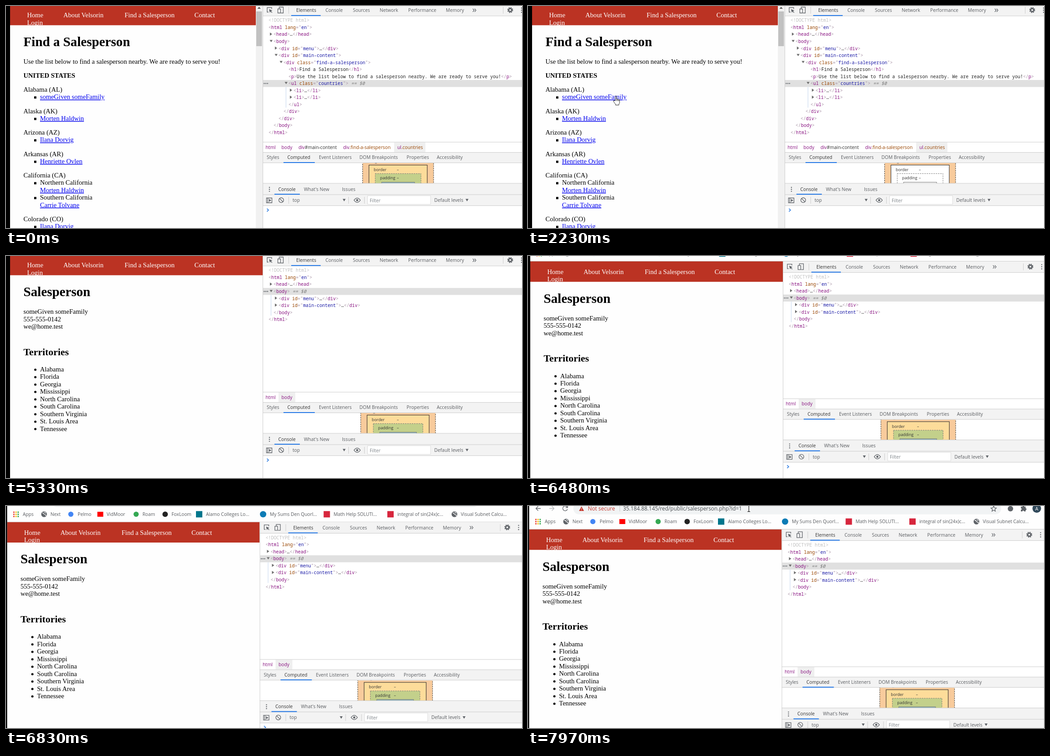
Recreate the animation shown at these times as an HTML page. Size 1138 by 492 pixels, loop 8000 ms.

```html
<!DOCTYPE html>
<html lang="en">
<head>
<meta charset="utf-8">
<title>Find a Salesperson</title>
<style>
html, body { margin: 0; width: 100%; height: 100%; overflow: hidden; background: #fefefe; }
svg { display: block; }
.page { font: 14.6px "Liberation Serif", "Times New Roman", serif; fill: #000; }
.page .h1 { font-size: 29.2px; font-weight: bold; }
.page .h2 { font-size: 21.9px; font-weight: bold; }
.bold { font-weight: bold; }
.link { fill: #00e; text-decoration: underline; }
.nav { fill: #fff; }
.ui { font: 10.25px "Open Sans", "Noto Sans", sans-serif; fill: #5a5d61; }
.ui .on { fill: #333; }
.ui .tag, .code .tag { fill: #881280; }
.ui .attr, .code .attr { fill: #994500; }
.ui .small { font-size: 8.8px; fill: #333; }
.ui .url { font-size: 11.85px; fill: #45484c; }
.ui .hint { fill: #80868b; }
.code { font: 10.03px "Noto Sans Mono", "DejaVu Sans Mono", monospace; fill: #222; }
.code .punct { fill: #a894a6; }
.code .val { fill: #1a1aa6; }
.code .doctype { fill: #c0c0c0; }
.code .ref { fill: #777; font-style: italic; }
.line { stroke: #ccc; fill: none; }
.icon { stroke: #5f6368; fill: none; stroke-width: 1.3; }
.bar { fill: #f3f3f3; }
.blue { fill: #1a73e8; }

#cam, #list, #detail, #tree1, #tree2, .cursor, #ring, .fade { animation: 8s step-end infinite; }
#cam { animation-name: pan; }
#list { animation-name: hide-page; }
#detail { animation-name: show-page; }
#tree1 { animation-name: hide-tree; }
#tree2 { animation-name: show-tree; }
#ring { animation-name: press; }
#tree1 .fade { animation-name: drain; }
#arrow { animation-name: arrow; }
#hand { animation-name: hand; }
#beam { animation-name: beam; }

@keyframes pan {
  0% { transform: none; }
  81% { transform: translate(-4px, 14.6px); }
  82.25% { transform: translate(-4.2px, 22px); }
  84% { transform: translate(-6.5px, 31px); }
  85.375% { transform: translate(-6.5px, 38.4px); }
  87% { transform: translate(-6.5px, 46px); }
  88.875% { transform: translate(-6.5px, 52px); }
  90.125%, 100% { transform: translate(-6.5px, 54.6px); }
}
@keyframes hide-page { 0% { visibility: visible; } 35.875%, 100% { visibility: hidden; } }
@keyframes show-page { 0% { visibility: hidden; } 35.875%, 100% { visibility: visible; } }
@keyframes hide-tree { 0% { visibility: visible; } 37.125%, 100% { visibility: hidden; } }
@keyframes show-tree { 0% { visibility: hidden; } 37.125%, 100% { visibility: visible; } }
@keyframes drain { 4.375%, 100% { fill: #fff; } }
@keyframes press { 0% { opacity: 0; } 24.625% { opacity: .5; } 27.875%, 100% { opacity: 0; } }
@keyframes arrow {
  0% { transform: translate(-99px, 0); }
  4.375% { transform: translate(718px, 340px); }
  6.25% { transform: translate(624px, 310px); }
  9.25% { transform: translate(560px, 290px); }
  10.75% { transform: translate(490px, 269px); }
  12.25% { transform: translate(420px, 248px); }
  13.75% { transform: translate(350px, 228px); }
  15.25% { transform: translate(295px, 213px); }
  16.75% { transform: translate(252px, 205px); }
  18.625% { transform: translate(232px, 203px); }
  20% { transform: translate(-99px, 0); }
  49.625% { transform: translate(181px, 182px); }
  51.5% { transform: translate(178px, 165px); }
  53% { transform: translate(175px, 148px); }
  54.375% { transform: translate(173px, 132px); }
  55.875% { transform: translate(172px, 118px); }
  57.75% { transform: translate(152px, 98px); }
  59.125% { transform: translate(190px, 84px); }
  60.5% { transform: translate(235px, 78px); }
  62.25% { transform: translate(249px, 75px); }
  66.625%, 100% { transform: translate(-99px, 0); }
}
@keyframes hand {
  0% { transform: translate(-99px, 0); }
  20% { transform: translate(208px, 201px); }
  21.5% { transform: translate(194px, 200px); }
  49.625%, 100% { transform: translate(-99px, 0); }
}
@keyframes beam {
  0% { transform: translate(-99px, 0); }
  95.125% { transform: translate(449px, 6px); }
  96.5% { transform: translate(474px, 6px); }
  98.375% { transform: translate(482px, 6px); }
  99.625%, 100% { transform: translate(487px, 6px); }
}
</style>
</head>
<body>
<svg width="1138" height="492" viewBox="0 0 1138 492">
<g id="cam">
  <!-- browser toolbar -->
  <g class="ui" transform="translate(6.5 -54.6)">
    <path class="icon" stroke-width="1.6" d="M28 5.500H17.500M22.500 .5l-5 5 5 5"/>
    <path class="icon" style="stroke:#b8babd" d="M47 5.500H57.500M52.500 .5l5 5-5 5"/>
    <path class="icon" d="M86.500 2.500A5.300 5.300 0 1 0 87 7M87.500 -1v4.500h-4.500"/>
    <rect x="100" y="-7" width="943.500" height="25.500" rx="12.700" fill="#f1f3f4"/>
    <path d="M118 1l5.500 10h-11z" fill="#c5372c"/><path d="M118 4.500v3M118 8.300v1.300" stroke="#fff"/>
    <text class="url" x="132" y="10.300" style="fill:#c5372c">Not secure</text>
    <path class="line" d="M202.500 0v12"/>
    <text class="url" x="209.500" y="10.300">35.184.88.145/red/public/salesperson.php?id=1</text>
    <path class="icon" d="M1027 0l1.700 4 4.300.4-3.300 2.800 1 4.300-3.700-2.300-3.700 2.300 1-4.300-3.300-2.800 4.300-.4z"/>
    <circle cx="1064" cy="6" r="6" fill="#5f6368"/>
    <path d="M1087 1.500h3.500a2 2 0 1 1 4 0h3v3.500a2 2 0 1 1 0 4v3h-3.500a1.800 1.800 0 0 0-3.600 0h-3.400v-3.500a1.800 1.800 0 0 0 0-3.600z" fill="#5f6368"/>
    <circle cx="1122" cy="5.500" r="9.500" fill="#31495a"/>
    <text x="1122" y="9.500" text-anchor="middle" style="fill:#fff">A</text>
    <g id="marks"></g>
    <path class="line" d="M0 51.500H1150"/>
  </g>

  <!-- web page -->
  <g class="page">
    <rect x="9" y="-2.600" width="557" height="560" fill="#fefefe"/>
    <rect x="9" y="-2.600" width="557" height="45.200" fill="#bb3323"/>
    <g class="nav" id="nav"></g>
    <g id="list">
      <text class="h1" x="38.500" y="89">Find a Salesperson</text>
      <text x="38.500" y="128">Use the list below to find a salesperson nearby. We are ready to serve you!</text>
      <text class="bold" x="38.500" y="159">UNITED STATES</text>
      <g id="states"></g>
      <rect x="551" y="-2.600" width="15" height="560" fill="#f1f1f1"/>
      <rect x="552" y="12" width="12.500" height="77" fill="#c1c1c1"/>
      <path d="M554.500 6l3.700-4 3.700 4z" fill="#505050"/>
    </g>
    <g id="detail">
      <text class="h1" x="38.500" y="89">Salesperson</text>
      <text x="38.500" y="128">someGiven someFamily</text>
      <text x="38.500" y="144.500">555-555-0142</text>
      <text x="38.500" y="161">we@home.test</text>
      <text class="h2" x="38.500" y="219.700">Territories</text>
      <g id="areas"></g>
    </g>
  </g>

  <!-- inspector -->
  <rect x="566" y="-2.600" width="600" height="560" fill="#fff"/>
  <g class="ui">
    <rect class="bar" x="566" y="-2.600" width="600" height="24.600"/>
    <path class="line" d="M566 22H1160M623.500 2v15M1096.500 2v15"/>
    <rect class="blue" x="629" y="20.200" width="65" height="1.900"/>
    <path class="icon" d="M579 13.500h-3v-10h10v3"/><path d="M580 7l7.500 3-3 1.200 2.800 3-1 1-2.800-3-1.500 2.800z" fill="#5f6368"/>
    <path class="icon" d="M602.500 6v-3.500h9v13h-5M599.500 6.500h6v9h-6z"/>
    <path class="icon" d="M1029.500 6l3 3.500-3 3.500M1033.500 6l3 3.500-3 3.500"/>
    <circle cx="1112" cy="9" r="5.300" stroke="#5f6368" stroke-width="2.200" stroke-dasharray="2.400 1.760" fill="none"/>
    <circle class="icon" cx="1112" cy="9" r="3.400" style="stroke-width:2.600"/>
    <g fill="#5f6368"><circle cx="1137" cy="4.500" r="1.200"/><circle cx="1137" cy="9.200" r="1.200"/><circle cx="1137" cy="13.900" r="1.200"/></g>
    <g id="tabs"></g>
  </g>
  <g id="tree1"></g>
  <g id="tree2"></g>
  <g class="ui">
    <rect class="bar" x="566" y="324.500" width="600" height="23"/>
    <path class="line" d="M566 301.700H1160M566 324.500H1160M566 347.500H1160"/>
    <rect class="blue" x="612" y="346" width="69" height="1.900"/>
    <rect class="bar" x="566" y="393" width="600" height="49.500"/>
    <path class="line" d="M566 393H1160M566 418H1160M566 442.500H1160M623.500 423v15M755.500 423v15M790.500 423v15"/>
    <rect class="blue" x="592" y="416.200" width="56" height="1.900"/>
    <g fill="#5f6368"><circle cx="581" cy="402" r="1.200"/><circle cx="581" cy="406.300" r="1.200"/><circle cx="581" cy="410.600" r="1.200"/></g>
    <path class="icon" d="M574.500 425.500h12v10.500h-12zM577.500 425.500v10.500"/><path d="M580 427.500l5 3.300-5 3.300z" fill="#5f6368"/>
    <path class="icon" d="M603.300 426.500l7.500 7.500M601.700 430.300a5.300 5.300 0 1 0 10.600 0a5.300 5.300 0 1 0-10.600 0"/>
    <path class="icon" d="M767.500 430.300q7-9.500 14 0q-7 9.500-14 0z"/><circle cx="774.500" cy="430.300" r="2.400" fill="#5f6368"/>
    <path d="M742.500 427.500h6.500l-3.200 5.500zM1013.500 427.500h6.500l-3.200 5.500z" fill="#5f6368"/>
    <rect x="797.500" y="420.500" width="139" height="19" fill="#fff" stroke="#ddd"/>
    <g id="panes"></g>
    <path d="M575.500 449l3.500 3.300-3.500 3.300" fill="none" stroke="#2f7de1" stroke-width="1.600"/>
  </g>
  <path d="M566.500 -2.600V560" class="line"/>
  <rect x="-20" y="-80" width="29" height="660"/>
</g>

<circle id="ring" cx="193.500" cy="200" r="11" fill="#ff0"/>
<path id="arrow" class="cursor" d="M.5 .5v14l3.200-3 2.200 5 2.300-1-2.200-4.800h4.500z" fill="#fff" stroke="#000" stroke-width=".9"/>
<path id="hand" class="cursor" d="M-1.300 10V.8a1.400 1.400 0 0 1 2.800 0V6.500q1.400-1 2.300.3 1.500-.6 2.200.8 2-.5 2 1.700v4q0 2-1.500 4v2.200h-7.500v-2q-2.500-2.500-4.500-6.500-.3-2 1.500-1.500zM1.500 6.500v4M3.800 7v3.500M6 7.800v3" fill="#fff" stroke="#111" stroke-width=".9"/>
<path id="beam" class="cursor" d="M-3-6.500h2.200l.8.700.8-.7H3M0-5.800V5.800M-3 6.500h2.200l.8-.7.8.7H3" fill="none" stroke="#000" stroke-width="1.100"/>
</svg>
<script>
const $ = id => document.getElementById(id);
const text = (x, y, s, cls = '') => `<text class="${cls}" x="${x}" y="${y}">${s}</text>`;
const span = (cls, s) => `<tspan class="${cls}">${s}</tspan>`;
const row = (y, items) => items.map(([x, s, cls]) => text(x, y, s, cls)).join('');
const disc = (x, y, r, fill) => `<circle cx="${x}" cy="${y}" r="${r}" fill="${fill}"/>`;
const box = (x, y, w, h, attrs) => `<rect x="${x}" y="${y}" width="${w}" height="${h}" ${attrs}/>`;

// Page
const LINE = 16.45, GAP = 14.6;
$('nav').innerHTML = row(25.3, [[46.5, 'Home'], [126.5, 'About Velsorin'], [261.5, 'Find a Salesperson'], [415.5, 'Contact']])
  + text(46.5, 41.8, 'Login');

const people = ['someGiven someFamily', 'Morten Haldwin', 'Ilana Dorvig', 'Henriette Ovlen', 'Carrie Tolvane'];
const states = [
  ['Alabama (AL)', [0]], ['Alaska (AK)', [1]], ['Arizona (AZ)', [2]], ['Arkansas (AR)', [3]],
  ['California (CA)', [1, 'Northern California'], [4, 'Southern California']], ['Colorado (CO)', [2]]
];
let y = 190, out = '';
for (const [state, ...entries] of states) {
  out += text(38.5, y, state);
  for (const [who, region] of entries) {
    y += LINE;
    out += box(62, y - 6.2, 5, 5, '');
    if (region) { out += text(75, y, region); y += LINE; }
    out += text(75, y, people[who], 'link');
  }
  y += LINE + GAP;
}
$('states').innerHTML = out;

$('areas').innerHTML = ['Alabama', 'Florida', 'Georgia', 'Mississippi', 'North Carolina', 'South Carolina',
  'Southern Virginia', 'St. Louis Area', 'Tennessee']
  .map((s, i) => text(75, 256 + i * LINE, s) + disc(64.7, 252 + i * LINE, 2.5, '#000')).join('');

// Bookmarks
const globe = x => disc(x, 34.5, 6.3, '#5f6368')
  + `<path d="M${x - 4} 31.500q3 0 3.500 2t3 2 1 3M${x + 1} 29.500q0 2 3.500 2.500" stroke="#fff" stroke-width="1.300" fill="none"/>`;
const tile = (x, fill, w = 14, h = 14) => box(x - w / 2, 34.5 - h / 2, w, h, `fill="${fill}"`);
const dotColors = ['#ea4335', '#fbbc04', '#34a853', '#4285f4'];
let grid = '';
for (let i = 0; i < 9; i++)
  grid += box(16 + i % 3 * 4.7, 28.5 + (i / 3 | 0) * 4.7, 2.9, 2.9, `fill="${dotColors[(i + (i / 3 | 0)) % 4]}"`);
$('marks').innerHTML = grid + globe(84) + disc(143, 34.5, 5.7, '#4285f4') + tile(208, '#f00', 13, 11)
  + disc(287, 34.5, 5.7, '#34a853') + disc(351, 34.5, 6, '#222') + tile(426, '#00768c')
  + disc(567, 34.5, 7, '#0b7bb5') + tile(707.5, '#d7263d') + tile(848, '#d7263d') + globe(989)
  + row(38.3, [[37, 'Apps'], [98, 'Next'], [158, 'Pelmo'], [222, 'VidMoor'], [301, 'Roam'], [365, 'FoxLoom'],
    [441, 'Alamo Colleges Lo...'], [582, 'My Sums Den Quorl...'], [722.5, 'Math Help SOLUTI...'],
    [863, 'integral of sin(24x)c...'], [1003, 'Visual Subnet Calcu...']]);

// Inspector labels
$('tabs').innerHTML = row(13.3, [[640, 'Elements', 'on'], [704.5, 'Console'], [765, 'Sources'], [824, 'Network'],
  [887, 'Performance'], [970, 'Memory']]);
$('panes').innerHTML = row(339.3, [[575, 'Styles'], [620.5, 'Computed', 'on'], [690, 'Event Listeners'],
  [779.5, 'DOM Breakpoints'], [883.5, 'Properties'], [950, 'Accessibility']])
  + row(409.8, [[600.5, 'Console', 'on'], [657, "What's New"], [741, 'Issues']])
  + row(434, [[632, 'top'], [944.5, 'Default levels']]) + text(802, 434.6, 'Filter', 'hint');

// Element tree: each row is [depth, markup, fold]
const paint = s => s.replace(/(<\/?)(\w+)(?: (\w+)="([^"]*)")?>/g, (m, open, tag, key, val) =>
  span('punct', open.replace('<', '&lt;')) + span('tag', tag)
  + (key ? ' ' + span('attr', key) + span('punct', '="') + span('val', val) + span('punct', '"') : '')
  + span('punct', '&gt;'));
const fold = { shut: 'M0-3.500l5 3.500-5 3.500z', open: 'M-.5-2.500h6.500l-3.200 5z' };

function tree(rows, picked, end) {
  const mid = i => 31.9 + i * 15.53;
  const guide = 579.5 + rows[picked][0] * 11 - 6;
  let s = box(567, mid(picked) - 7.7, 600, 15.5, 'fill="#e0e0e0"')
    + `<path d="M${guide} ${mid(picked) + 8}V${mid(end) + 7}" stroke="#c3d6ee"/>`;
  for (let k = 0; k < 3; k++) s += disc(569.5 + k * 3.7, mid(picked), 1.2, '#5f6368');
  rows.forEach(([depth, src, state], i) => {
    const x = 579 + depth * 11;
    const body = i ? paint(src) : span('doctype', src);
    s += text(x, mid(i) + 3.5, body + (i === picked ? span('ref', ' == $0') : ''));
    if (state) s += `<path transform="translate(${x - 8} ${mid(i) - .8})" d="${fold[state]}" fill="#6e6e6e"/>`;
  });
  return `<g class="code">${s}</g>`;
}

function boxModel(grow) {
  const ring = (inset, top, attrs) =>
    box(786.5 + inset - grow, top, 156.5 - inset * 2 + grow * 2, 90, attrs);
  const dash = 'stroke-dasharray="3 2"';
  return `<svg x="566" y="348" width="600" height="45" viewBox="566 348 600 45"><g class="ui">`
    + ring(0, 330, `fill="#f8cb9c" stroke="#333" ${dash}`)
    + text(797 - grow, 346.8, 'margin', 'small')
    + ring(14, 352.5, 'class="fade" fill="#fddc9a" stroke="#222"')
    + ring(27.8, 371.5, `class="fade" fill="#c3d08b" stroke="#777" ${dash}`)
    + ring(41.8, 390.5, 'class="fade" fill="#8cb6c0" stroke="#777"')
    + row(366, [[811 - grow, 'border', 'small'], [862, '–', 'small']])
    + row(384.3, [[825 - grow, 'padding', 'small'], [862, '–', 'small']]) + '</g></svg>';
}

const crumbs = (x, w, items) => box(x, 302.3, w, 21.7, 'fill="#efefef"') + `<g class="ui">${row(316.7, items)}</g>`;
const head = [[0, '&lt;!DOCTYPE html&gt;'], [0, '<html lang="en">'], [1, '<head>…</head>', 'shut'],
  [1, '<body>', 'open'], [2, '<div id="menu">…</div>', 'shut']];
const tail = [[1, '</body>'], [0, '</html>']];

$('tree1').innerHTML = tree([...head,
  [2, '<div id="main-content">', 'open'], [3, '<div class="find-a-salesperson">', 'open'],
  [4, '<h1>Find a Salesperson</h1>'],
  [4, '<p>Use the list below to find a salesperson nearby. We are ready to serve you!</p>'],
  [4, '<ul class="countries">', 'open'], [5, '<li>…</li>', 'shut'], [5, '<li>…</li>', 'shut'],
  [4, '</ul>'], [3, '</div>'], [2, '</div>'], ...tail], 9, 12)
  + crumbs(856, 69, [[572.5, 'html', 'tag'], [607.5, 'body', 'tag'], [645, span('tag', 'div') + '#main-content', 'on'],
    [743.5, span('tag', 'div') + '.find-a-salesperson', 'attr'], [863, span('tag', 'ul') + '.countries', 'attr']])
  + boxModel(0);

$('tree2').innerHTML = tree([...head, [2, '<div id="main-content">…</div>', 'shut'], ...tail], 3, 6)
  + crumbs(601, 37, [[572.5, 'html', 'tag'], [607.5, 'body', 'tag']])
  + boxModel(4.2);
</script>
</body>
</html>
```
